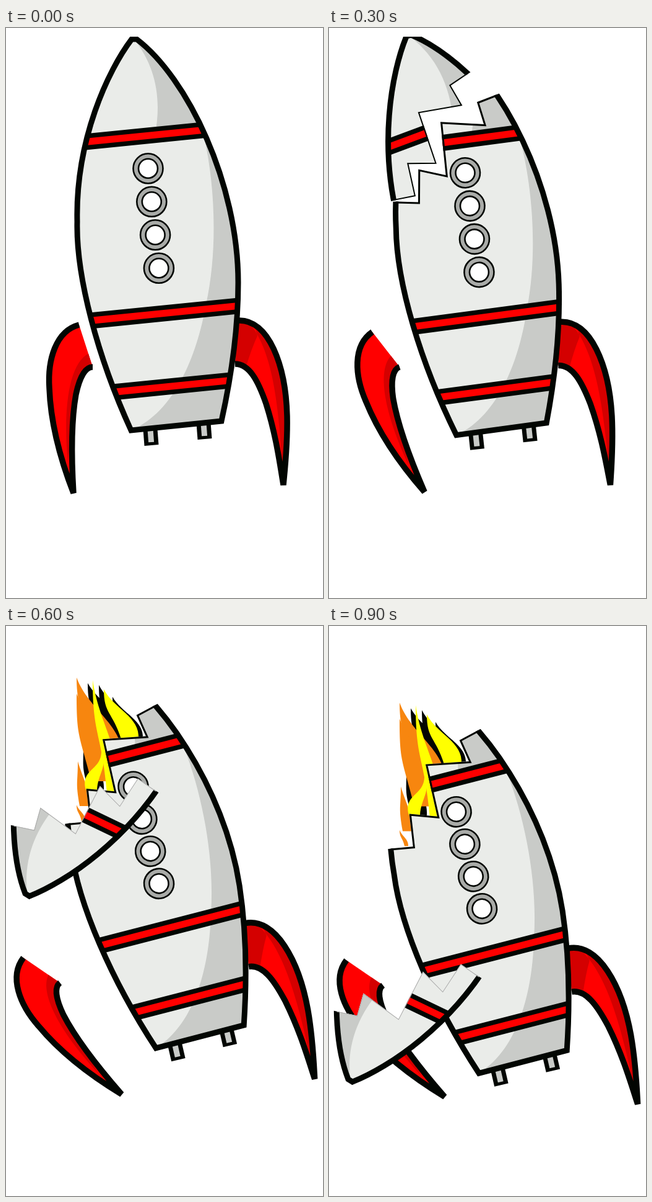
An HTML page with a canvas that plays this animation: 512x918 px, repeating every 1 s.

```html
<!DOCTYPE html>
<html lang="en">
<head>
<meta charset="utf-8">
<title>Rocket breaking apart</title>
<style>
html, body { margin: 0; width: 100%; height: 100%; overflow: hidden; background: #fff; }
canvas { display: block; width: 100%; height: 100%; }
</style>
</head>
<body>
<canvas id="stage" width="512" height="918"></canvas>
<script>
const ctx = document.getElementById('stage').getContext('2d');
const INK = '#020602', LIGHT = '#eaece9', SHADE = '#c9cbc8', RED = '#f00', DARK = '#d40000';
const ORANGE = '#f7860f', YELLOW = '#ff0';
const path = d => new Path2D(d);

const hull = path('M203 18H211C293 80 375 250 375 410C375 490 362 570 348 633L202 648' +
  'C148 530 113 400 115 312C112 180 165 68 203 18Z');
const hullShade = path('M207 18C240 60 252 110 241 170L330 162L300 60Z' +
  'M320 176C338 255 342 360 323 445C308 530 271 618 204 647L348 633L400 410L340 176Z');

const crackLine = 'M0 268L118 269L152 271L154 218L198 229L192 143L262 149L252 113L289 100L320 89';
const crack = path(crackLine);
const below = path(crackLine + 'H600V950H0Z');
const above = path(crackLine + 'H600V-200H-200V268Z');

const rightFin = {
  shape: path('M374 471C425 468 452 545 454 625C455 670 451 705 448 736' +
    'C442 700 436 655 420 605C407 568 393 541 370 541'),
  dark: path('M366 466H398L406 496Q397 515 387 548H366Z' +
    'M385 466C430 510 440 600 447 715L462 620C455 540 420 466 385 466Z')
};
const leftFin = {
  shape: path('M118 478C80 488 67 535 70 580C72 635 88 695 109 749' +
    'C106 700 104 640 113 590C119 562 128 546 140 546'),
  dark: path('M134 524C100 540 92 620 100 700L112 590L142 547Z')
};

// Key poses: step, x, y, degrees; the fin is relative to the body
const bodyKeys = [[0, 229.5, 226, 0], [2, 229.5, 238, 0], [3, 220, 233, -1.8], [4, 209.5, 249, -8.7],
  [6, 205.5, 258.5, -8.7], [7, 209, 280, -8.7], [9, 205.5, 299, -8.7]];
const finKeys = [[0, -112.5, 249, 0], [2, -112.5, 249, 0], [3, -152, 254, -20],
  [4, -180, 274, -37.7], [7, -180, 274, -37.7], [9, -180, 237.5, -37.7]];
const headKeys = [[0, 207, 148, 0], [2, 203.5, 159, -1.8], [3, 162, 138, -14.7], [4, 141.5, 158, -21.4],
  [6, 102, 322, -148.7], [7, 98, 441, -148.7], [9, 102, 621, -148.7]];

function poseAt(keys, step) {
  const i = Math.max(1, keys.findIndex(k => k[0] >= step));
  const a = keys[i - 1], b = keys[i], u = (step - a[0]) / (b[0] - a[0]);
  return a.map((v, n) => v + (b[n] - v) * u).slice(1);
}

function scoped(draw) {
  ctx.save();
  draw();
  ctx.restore();
}

// Draws a part with its anchor (ax, ay) moved to (x, y) and turned
function placed([x, y, deg], ax, ay, draw) {
  scoped(() => {
    ctx.translate(x, y);
    ctx.rotate(deg * Math.PI / 180);
    ctx.translate(-ax, -ay);
    draw();
  });
}

function fill(shape, color) {
  ctx.fillStyle = color;
  ctx.fill(shape);
}

function stroke(shape, width, color = INK) {
  ctx.lineWidth = width;
  ctx.strokeStyle = color;
  ctx.stroke(shape);
}

function disc(x, y, r, color) {
  const p = new Path2D();
  p.arc(x, y, r, 0, 7);
  fill(p, color);
  stroke(p, 2.6);
}

function drawFin({ shape, dark }) {
  fill(shape, RED);
  scoped(() => {
    ctx.clip(shape);
    fill(dark, DARK);
  });
  scoped(() => {
    ctx.lineJoin = 'bevel';
    stroke(shape, 9.5);
  });
}

function drawHull() {
  fill(hull, LIGHT);
  scoped(() => {
    ctx.clip(hull);
    fill(hullShade, SHADE);
    for (const y of [171.3, 460, 578.8]) {
      const band = path(`M100 ${y + 15}L400 ${y - 15}`);
      stroke(band, 26);
      stroke(band, 11, RED);
    }
  });
  stroke(hull, 9);
  for (let i = 0; i < 4; i++) {
    const x = 229.5 + i * 5.8, y = 226.3 + i * 53.5;
    disc(x, y, 24, '#a9aba8');
    disc(x, y, 15.5, '#fff');
  }
}

function drawPiece(side, edge, color) {
  scoped(() => {
    ctx.clip(side);
    drawHull();
    ctx.clip(hull);
    stroke(crack, edge, color);
  });
}

function drawBody(broken) {
  for (const [x, y] of [[233, 646], [319, 636]]) {
    stroke(path(`M${x} ${y}l2 26`), 23);
    stroke(path(`M${x} ${y}l1.6 21`), 9, SHADE);
  }
  drawFin(rightFin);
  if (broken) drawPiece(below, 6, INK);
  else drawHull();
}

// A curling flame from its tip (x, y) to the middle of its foot (fx, fy)
function tongue(color, x, y, fx, fy, w) {
  const h = fy - y;
  fill(path(`M${x} ${y}C${x} ${y + h * 0.5} ${fx - w} ${y + h * 0.45} ${fx - w / 2} ${fy}H${fx + w / 2}` +
    `C${fx + w * 0.6} ${y + h * 0.55} ${x + w * 0.6} ${y + h * 0.4} ${x} ${y}Z`), color);
}

function drawFlames() {
  tongue(INK, 132, 92, 176, 182, 34);
  tongue(INK, 150, 95, 188, 182, 30);
  tongue(INK, 172, 114, 208, 182, 26);
  tongue(INK, 125, 192, 146, 266, 24);
  tongue(ORANGE, 114, 83, 172, 220, 34);
  tongue(ORANGE, 114, 109, 158, 250, 40);
  tongue(ORANGE, 116, 218, 126, 290, 14);
  tongue(ORANGE, 114, 288, 125, 314, 6);
  tongue(YELLOW, 140, 87, 172, 268, 18);
  tongue(YELLOW, 158, 102, 200, 182, 28);
  tongue(YELLOW, 154, 202, 138, 264, 18);
}

function frame(now) {
  const step = Math.floor(now % 1000 / 100);
  const broken = step > 0, fallen = step > 4;
  const body = poseAt(bodyKeys, step), fin = poseAt(finKeys, step);
  fin[0] += body[0];
  fin[1] += body[1];
  ctx.fillStyle = '#fff';
  ctx.fillRect(0, 0, 512, 918);
  scoped(() => {
    ctx.beginPath();
    ctx.rect(0, 14, 512, 904);
    ctx.clip();
    if (fallen) placed([body[0], body[1], 0], 205.5, 258.5, drawFlames);
    placed(body, 229.5, 226, () => drawBody(broken));
    placed(fin, 117, 475, () => drawFin(leftFin));
    if (broken) {
      placed(poseAt(headKeys, step), 207, 148,
        () => drawPiece(above, fallen ? 2 : 4, fallen ? '#aaa' : INK));
    }
  });
  requestAnimationFrame(frame);
}
requestAnimationFrame(frame);
</script>
</body>
</html>
```
